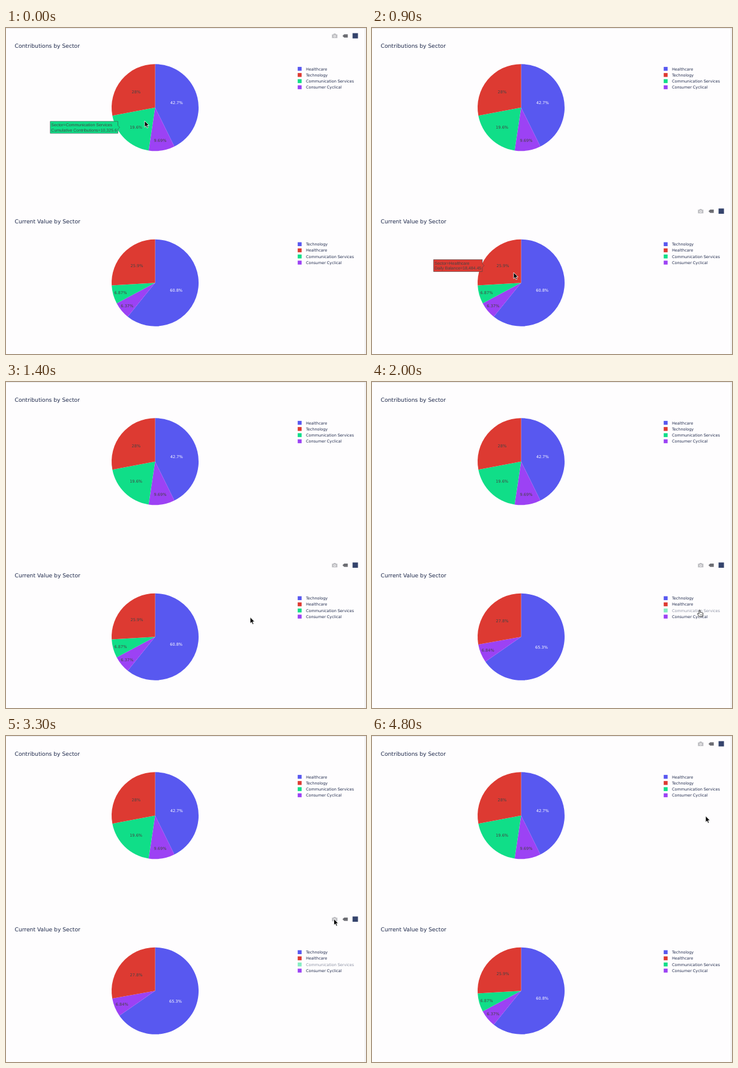
An HTML page that plays this animation: 600 by 544 pixels, repeating every 5.7 s.

```html
<!DOCTYPE html>
<html>
<head>
<meta charset="utf-8">
<style>
  html, body { margin: 0; width: 100%; height: 100%; overflow: hidden; background: #fefdfe; }
  svg { display: block; text-rendering: geometricPrecision; font: 6.45px "DejaVu Sans", sans-serif; }
  .title { font-size: 9.2px; }
  .share { font-size: 6.6px; text-anchor: middle; }
  .tip { font: 7px "Liberation Sans", Arial, sans-serif; }
</style>
</head>
<body>
<svg id="stage" width="600" height="544" viewBox="0 0 600 544"></svg>
<script>
const LOOP = 5700, STEP = 100;
const CX = 248.5, CY = 132.7, R = 72.5, CHART_H = 292.6;
const BLUE = '#5858f0', RED = '#dd3a32', GREEN = '#10de88', PURPLE = '#9c42f4';
const COLORS = [BLUE, RED, GREEN, PURPLE], INK = '#1f2a4c', DARK = '#444';
const ORDER = [0, 3, 2, 1]; // clockwise from the top
const TOGGLED = 2;

const charts = [
  { title: 'Contributions by Sector', measure: 'Cumulative Contributions', digits: 1, y: 0,
    names: ['Healthcare', 'Technology', 'Communication Services', 'Consumer Cyclical'],
    values: [22484.9, 14744.2, 10325.6, 5102.4], off: [2800, 3300] },
  { title: 'Current Value by Sector', measure: 'Daily Balance', digits: 2, y: CHART_H,
    names: ['Technology', 'Healthcare', 'Communication Services', 'Consumer Cyclical'],
    values: [43392.17, 18484.45, 4903.06, 4546.2], off: [2000, 3700] }
];

// Pointer stops: time, x, y
const path = [
  [0, 231, 155], [500, 282, 148], [900, 236, 408], [1400, 407, 392.5], [1700, 546.5, 380.5],
  [2200, 546.5, 380.5], [2500, 546.5, 90.5], [3100, 546.5, 90.5], [3400, 546.5, 380.5],
  [3900, 546.5, 380.5], [4300, 557, 400], [4800, 556, 133.5], [LOOP, 556, 133.5]
];

const stage = document.getElementById('stage');
const pen = document.createElement('canvas').getContext('2d');
pen.font = '7px "Liberation Sans", Arial, sans-serif';

const text = (x, y, s, fill = INK, cls = '') =>
  `<text x="${x}" y="${y}" fill="${fill}" class="${cls}">${s}</text>`;
const rect = (x, y, w, h, fill) =>
  `<rect x="${x}" y="${y}" width="${w}" height="${h}" fill="${fill}"/>`;
const rowY = i => 68.2 + i * 10.25;

function pointerAt(t) {
  const i = path.findIndex(p => p[0] > t);
  const [t0, x0, y0] = path[i - 1], [t1, x1, y1] = path[i];
  const k = (t - t0) / (t1 - t0), e = k * k * (3 - 2 * k);
  return { x: x0 + (x1 - x0) * e, y: y0 + (y1 - y0) * e };
}

function slices(chart, hidden) {
  const shown = ORDER.filter(i => !(hidden && i === TOGGLED));
  const total = shown.reduce((sum, i) => sum + chart.values[i], 0);
  let from = 0;
  return shown.map(i => {
    const part = chart.values[i] / total, to = from + part * 2 * Math.PI;
    const mid = (from + to) / 2, s = Math.sin(part * Math.PI);
    const inner = s / (1 + s); // radius of the inscribed circle
    const slice = { i, part, from, to, r: inner * R,
      x: CX + R * (1 - inner) * Math.sin(mid), y: CY - R * (1 - inner) * Math.cos(mid) };
    from = to;
    return slice;
  });
}

function drawSlice({ i, part, from, to, x, y }) {
  const rim = a => `${CX + R * Math.sin(a)} ${CY - R * Math.cos(a)}`;
  return `<path d="M${CX} ${CY}L${rim(from)}A${R} ${R} 0 ${+(part > .5)} 1 ${rim(to)}Z" fill="${COLORS[i]}"/>` +
    text(x, y + 2.3, +(part * 100).toPrecision(3) + '%', i ? DARK : '#fff', 'share');
}

function drawTip(chart, { i, x, y, r }) {
  const value = chart.values[i].toLocaleString('en-US',
    { minimumFractionDigits: chart.digits, maximumFractionDigits: chart.digits });
  const lines = ['Sector=' + chart.names[i], `${chart.measure}=${value}`];
  const w = Math.max(...lines.map(s => pen.measureText(s).width)) + 3.2;
  const side = x > CX ? 1 : -1, tip = x + side * (r + .6), edge = tip + side * 3;
  const far = edge + side * w, left = Math.min(edge, far) + 1.6;
  const ink = i ? DARK : '#fff';
  return `<path d="M${tip} ${y}L${edge} ${y - 3}V${y - 10}H${far}V${y + 10}H${edge}V${y + 3}Z"
    fill="${COLORS[i]}" stroke="${ink}" stroke-width=".6"/>` +
    text(left, y - 1.9, lines[0], ink, 'tip') + text(left, y + 6.8, lines[1], ink, 'tip');
}

const drawLegend = (chart, hidden) => chart.names.map((name, i) =>
  `<g opacity="${hidden && i === TOGGLED ? .5 : 1}">` +
  rect(486.2, rowY(i) - 3.3, 6.5, 6.5, COLORS[i]) + text(500, rowY(i) + 2.3, name) + '</g>').join('');

const toolbar =
  `<path d="M543.3 10.7h2.2l.8-1.4h3l.8 1.4h2.2v6h-9z" fill="#bdbdc1"/>
   <circle cx="547.8" cy="13.6" r="1.9" fill="#fefdfe"/><circle cx="547.8" cy="13.6" r="1.1" fill="#bdbdc1"/>
   <path d="M560.8 13.2l2.8-2.8h6v5.6h-6z" fill="#6c6d73"/>` + rect(577.6, 8.6, 9, 8.8, '#35446c');

const arrow = `<path d="M0 0V10.4L2.4 8.2L4 11.9L5.8 11.1L4.2 7.5H7.4Z" fill="#000" stroke="#fff" stroke-width=".8"/>`;
const hand = `<path d="M-1.4 .5Q-.4-.6.5.5V4Q1.5 3.3 2.2 4.2Q3.2 3.6 3.8 4.6Q5 4.2 5.2 5.4V7.8L4.2 10.8H-1.2L-4 6.8Q-4.2 5.2-2.8 5.6L-1.4 6.8Z"
  fill="#fff" stroke="#111" stroke-width=".8"/><path d="M.6 7V9M2.1 7V9M3.5 7V9" stroke="#111" stroke-width=".5"/>`;

function drawChart(chart, t, p) {
  const hidden = t >= chart.off[0] && t < chart.off[1];
  const parts = slices(chart, hidden);
  const dx = p.x - CX, dy = p.y - chart.y - CY;
  const angle = (Math.atan2(dx, -dy) + 2 * Math.PI) % (2 * Math.PI);
  const over = Math.hypot(dx, dy) < R && parts.find(s => angle < s.to);
  const active = (p.y < CHART_H) === (chart.y === 0);
  return `<g transform="translate(0 ${chart.y})">` + text(14.5, 33.3, chart.title, INK, 'title') +
    parts.map(drawSlice).join('') + drawLegend(chart, hidden) +
    (active ? toolbar : '') + (over ? drawTip(chart, over) : '') + '</g>';
}

function onLegend(p) {
  return p.x > 484 && p.x < 582 &&
    charts.some(c => c.names.some((_, i) => Math.abs(p.y - c.y - rowY(i)) < 5.2));
}

function draw(t) {
  const p = pointerAt(t);
  stage.innerHTML = rect(0, 0, 600, 1, '#e8e7e9') + rect(598, 0, 1, 544, '#e4e3e6') +
    charts.map(c => drawChart(c, t, p)).join('') +
    `<g transform="translate(${p.x} ${p.y})">${onLegend(p) ? hand : arrow}</g>`;
}

let last = -1;
function tick() {
  const t = Math.floor(performance.now() % LOOP / STEP) * STEP;
  if (t !== last) draw(last = t);
  requestAnimationFrame(tick);
}
tick();
</script>
</body>
</html>
```
